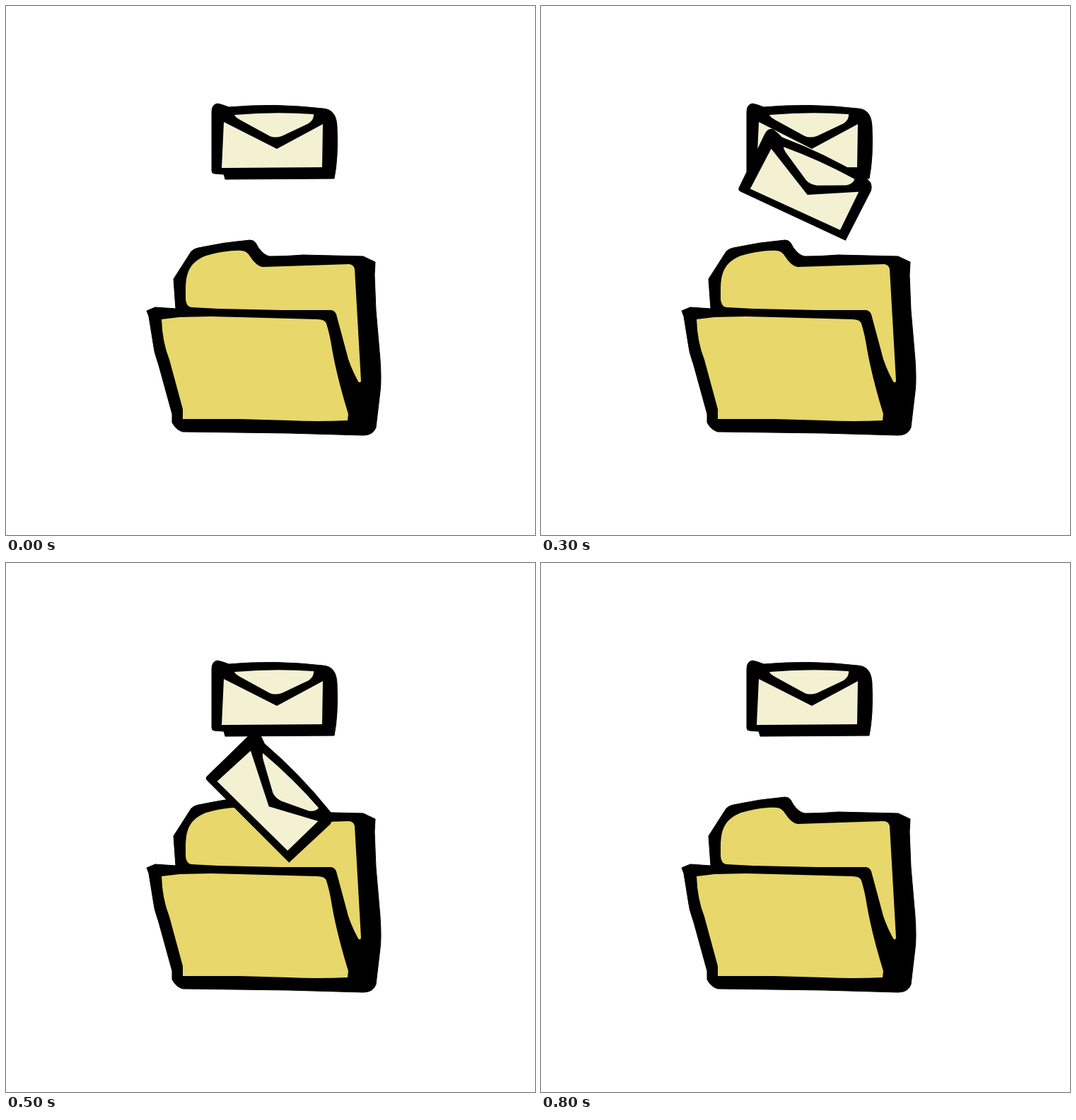
These frames come from a looping animation (748 by 748 pixels, 0.9 s). An HTML page:

```html
<!DOCTYPE html>
<html lang="en">
<head>
<meta charset="utf-8">
<title>Letters into a folder</title>
<style>
  html, body { margin: 0; width: 100%; height: 100%; overflow: hidden; background: #fff; }
  svg { display: block; width: 100%; height: 100%; }
  .ink { stroke: #000; stroke-width: 1; stroke-linejoin: round; }
  .paper { fill: #f4f1d3; }
  .card { fill: #e8d76a; }
</style>
</head>
<body>
<svg viewBox="0 0 748 748">
  <defs>
    <g id="panels" class="paper">
      <path d="M308 164L383 202L448 167L447 228L305 229Z"/>
      <path d="M323 154Q380 149 435 153Q436 160 428 166L390 184Q380 187 373 184L331 161Q324 157 323 154Z"/>
    </g>
    <clipPath id="mouth">
      <path d="M0 0H748V431H390L300 428H0Z"/>
    </clipPath>
  </defs>

  <!-- folder -->
  <path class="ink" d="M199 431L211 426L240 428L237 386L262 347Q266 343 272 342Q308 334 345 331Q350 331 353 335L357 342
           Q365 353 373 354Q395 354 420 352L505 354L522 362L521 380L523 430L529 500Q531 530 529 545L523 596
           Q519 607 505 607L400 604L250 602Q241 600 235 589L235 577L216 508Q209 490 207 470L202 439Z"/>
  <path class="card" d="M254 400C254 375 262 361 283 353C300 348 320 345 333 346Q340 346 345 354Q354 368 363 369
           L485 365Q492 366 493 372L502 530Q501 534 498 531Q485 507 481 488L467 436Q465 431 460 430
           L390 430L300 428L262 426Q255 425 254 415Z"/>
  <path class="card" d="M220 443L245 440L290 439L330 440L440 443Q451 443 453 449Q458 465 461 485Q468 525 484 577
           L483 586Q440 588 400 586L330 584L250 584L250 570L231 500Q221 475 220 443Z"/>

  <!-- waiting letter -->
  <path class="ink" d="M291 150Q291 139 299 138Q305 139 315 143Q380 137 448 145Q467 146 468 170Q470 215 464 244
           L310 245L308 238L295 237Q291 237 291 233Z"/>
  <use href="#panels"/>

  <!-- falling letter -->
  <g clip-path="url(#mouth)">
    <g id="letter">
      <path class="ink" d="M291 150Q291 139 299 138Q305 139 315 143Q380 138 448 145Q461 146 463 158L460 238L294 238Q290 238 290 234Z"/>
      <use href="#panels"/>
    </g>
  </g>
</svg>
<script>
const STEP = 100, LOOP = 900;
const letter = document.getElementById('letter');
const heights = [197, 208, 230, 260, 296, 336.5, 399, 455];

function draw(time) {
  const step = Math.floor((time % LOOP) / STEP);
  const falling = step > 0 && step < heights.length;
  letter.setAttribute('visibility', falling ? 'visible' : 'hidden');
  if (!falling) return;
  const x = 377 - 1.2 * step;
  const angle = 10 * step - 5;
  letter.setAttribute('transform',
    `translate(${x} ${heights[step]}) rotate(${angle}) scale(.985) translate(-377 -197)`);
}

const start = performance.now();
function tick() {
  draw(performance.now() - start);
  requestAnimationFrame(tick);
}
tick();
</script>
</body>
</html>
```
